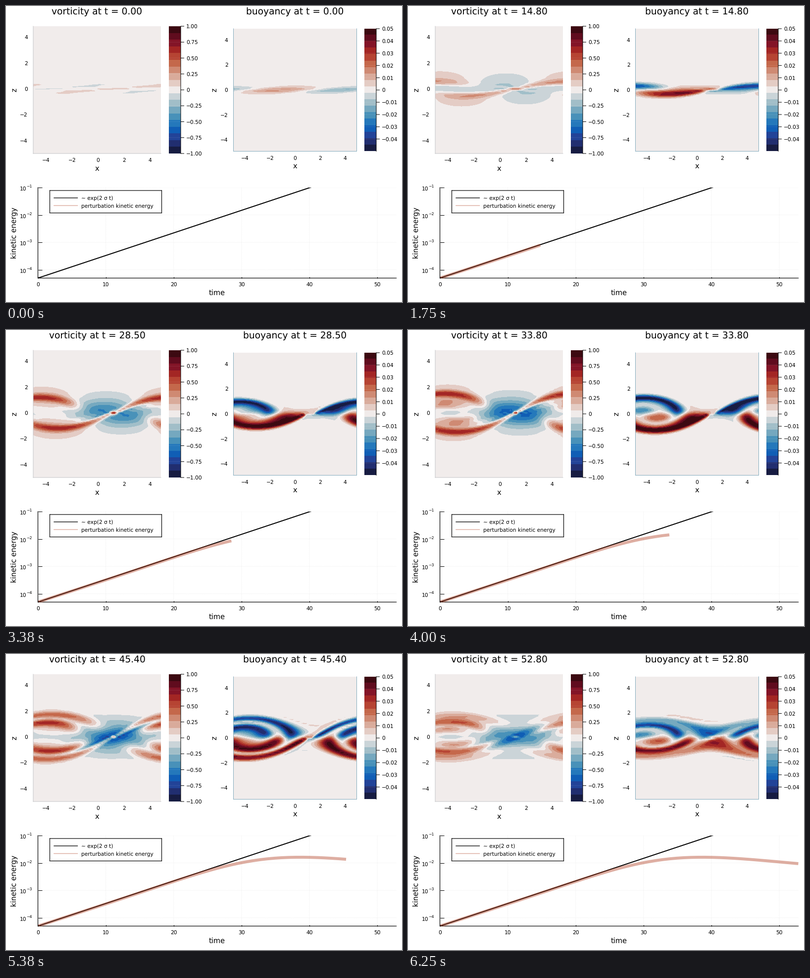
A matplotlib script for the animation above (6370 ms loop, 800 by 600 pixels).

```python
import math

import matplotlib.pyplot as plt
import numpy as np
from matplotlib.animation import FuncAnimation
from matplotlib.colors import LinearSegmentedColormap, ListedColormap

W, H, DPI = 800, 600, 100
PT = 72 / DPI                     # points per pixel
FRAMES, LOOP = 51, 6370
plt.rcParams.update({"font.family": "DejaVu Sans", "text.hinting": "none",
                     "path.snap": False})

# ---------------------------------------------------------------- flow solver
# Perturbations (u, w, b) of a stratified shear layer on a staggered grid,
# arrays indexed [z, x]; all stencils are small matrices.
N, HALF = 64, 5.0
DX = 2 * HALF / N
DT, VISC = 0.1, 2e-4
RI, DEPTH = 0.1, 0.25
SIGMA, ENERGY0 = 0.0948, 5e-5
BRAID_X = 1.19
SETTLE = 300

face = -HALF + DX * np.arange(N + 1)
cell = face[:-1] + DX / 2


def stencil(coefs, first, rows, cols, wrap):
    m = np.zeros((rows, cols))
    for r in range(rows):
        for j, c in enumerate(coefs):
            k = r + first + j
            m[r, k % cols if wrap else min(max(k, 0), cols - 1)] += c
    return m


def family(rows, cols, shift, wrap):
    """Sixth-order mean, upwind correction, two-point mean, difference."""
    sets = (np.array([1, -8, 37, 37, -8, 1]) / 60,
            np.array([1, -5, 10, -10, 5, -1]) / 60,
            [0.5, 0.5],
            [-1 / DX, 1 / DX])
    return [stencil(c, shift - len(c) // 2, rows, cols, wrap) for c in sets]


SXF, DXF, AXF, GXF = [m.T.copy() for m in family(N, N, 0, True)]
SXC, DXC, AXC, GXC = [m.T.copy() for m in family(N, N, 1, True)]
SZF, DZF, AZF, GZF = family(N + 1, N, 0, False)
SZC, DZC, AZC, GZC = family(N, N + 1, 1, False)
LX, LZC, LZF = GXF @ GXC, GZC @ GZF, GZF @ GZC

ex, QX = np.linalg.eigh(LX)
ez, QZ = np.linalg.eigh(LZC)
lam = ez[:, None] + ex[None, :]
lam[np.abs(lam) < 1e-8] = np.inf

U = np.tanh(cell)[:, None]
U_FACE = np.tanh(face)[:, None]
B = DEPTH * RI * np.tanh(cell / DEPTH)[:, None]


def flux(v, mean, corr, base=0.0):
    return (base + v) * mean + (np.abs(base) + np.abs(v)) * corr


def tendencies(u, w, b):
    a = u @ AXC
    du = -(flux(a, u @ SXC, u @ DXC, U) + a * U) @ GXF
    total = u + U
    du -= GZC @ flux(w @ AXF, SZF @ total, DZF @ total)
    du += VISC * (u @ LX + LZC @ u)

    dw = -flux(AZF @ u, w @ SXF, w @ DXF, U_FACE) @ GXC
    dw -= GZF @ flux(AZC @ w, SZC @ w, DZC @ w)
    dw += AZF @ b + VISC * (w @ LX + LZF @ w)
    dw[0] = dw[-1] = 0

    db = -(flux(u, b @ SXF, b @ DXF, U) + u * B) @ GXC
    total = b + B
    db -= GZC @ flux(w, SZF @ total, DZF @ total)
    db += VISC * (b @ LX + LZC @ b)
    return du, dw, db


def project(u, w):
    div = u @ GXC + GZC @ w
    phi = QZ @ ((QZ.T @ div @ QX) / lam) @ QX.T
    return u - phi @ GXF, w - GZF @ phi


def step(state):
    old = (0, 0, 0)
    for g, z in ((8 / 15, 0), (5 / 12, -17 / 60), (3 / 4, -5 / 12)):
        new = tendencies(*state)
        u, w, b = [s + DT * (g * n + z * o)
                   for s, n, o in zip(state, new, old)]
        state = (*project(u, w), b)
        old = new
    return state


def energy(state):
    u, w, _ = state
    return 0.5 * ((u ** 2).sum() + (w ** 2).sum()) / N ** 2


def unstable_wave(k):
    """Fastest growing linear mode: stream function and buoyancy profiles."""
    z, inner = face[1:-1], slice(1, -1)
    shear = np.tanh(z)
    curve = -2 * shear / np.cosh(z) ** 2
    strat = RI / np.cosh(z / DEPTH) ** 2
    lap = LZF[inner, inner] - k ** 2 * np.eye(N - 1)
    growth = 1j * k * np.block([
        [np.linalg.solve(lap, np.diag(curve) - shear[:, None] * lap),
         -np.linalg.solve(lap, AZF[inner])],
        [AZC[:, inner] * strat, -np.diag(U[:, 0])]])
    values, modes = np.linalg.eig(growth)
    mode = modes[:, values.real.argmax()]
    mode = mode / mode[N // 2 - 1]
    return np.pad(mode[:N - 1], 1), mode[N - 1:]


def growing_mode():
    """Let the linear mode adapt to the solver while tiny, then rescale."""
    k, amp = math.pi / HALF, 1e-6
    psi, b = unstable_wave(k)
    psi = amp * np.outer(psi, np.exp(1j * k * (face[:-1] - BRAID_X))).real
    b = amp * np.outer(b, np.exp(1j * k * (cell - BRAID_X))).real
    state = (GZC @ psi, -psi @ GXC, b)
    for _ in range(SETTLE):
        state = step(state)
    scale = math.sqrt(ENERGY0 / energy(state))
    return tuple(s * scale for s in state)


def simulate():
    state, done, out = growing_mode(), 0, []
    for k in range(FRAMES):
        goal = math.ceil(k * 0.1 / SIGMA / DT - 1e-9)
        while done < goal:
            state = step(state)
            done += 1
        u, w, b = state
        vort = (GZF @ u - w @ GXF)[:N]
        out.append((done * DT, vort, b, energy(state)))
    return out


history = simulate()
times = np.array([h[0] for h in history])
log_ke = np.log10([h[3] for h in history])

# ---------------------------------------------------------------- colours
BANDS = 19
ramp = [(23, 28, 66), (41, 58, 143), (11, 102, 189), (69, 144, 185),
        (142, 181, 194), (210, 216, 219), (241, 236, 235), (230, 210, 204),
        (213, 157, 137), (196, 101, 72), (172, 43, 36), (120, 14, 40),
        (60, 9, 17)]
stops = [i / 11 for i in range(6)] + [0.5] + [i / 11 for i in range(6, 12)]
balance = LinearSegmentedColormap.from_list(
    "balance", [(s, np.array(c) / 255) for s, c in zip(stops, ramp)], N=1024)
bands = [balance(i / (BANDS - 1)) for i in range(BANDS)]
KE_COLOR, KE_ALPHA = (176 / 255, 60 / 255, 30 / 255), 0.41

# ---------------------------------------------------------------- layout
fig = plt.figure(figsize=(W / DPI, H / DPI), dpi=DPI, facecolor="white")
SMALL, LABEL, TITLE = 10.67, 14.67, 18.67


def label(x, y, s, size=SMALL, ha="center", va="baseline", **kw):
    return fig.text(x / W, 1 - y / H, s, fontsize=size * PT, ha=ha, va=va, **kw)


def box(x0, y0, x1, y1):
    ax = fig.add_axes([x0 / W, 1 - y1 / H, (x1 - x0) / W, (y1 - y0) / H])
    ax.set_xticks([])
    ax.set_yticks([])
    return ax


def stroke(x, y, color="black", width=1.0):
    fig.add_artist(plt.Line2D(np.array(x) / W, 1 - np.array(y) / H,
                              color=color, lw=width * PT,
                              solid_capstyle="butt"))


def number(v, digits):
    return "0" if abs(v) < 1e-9 else f"{v:.{digits}f}".replace("-", "\u2212")


class Panel:
    """Filled contour map with its colour bar."""

    def __init__(self, name, rect, coords, limit, bar_x, ticks, edge, sides):
        self.name, self.coords, self.limit = name, coords, limit
        x0, y0, x1, y1 = rect
        lo, hi = coords[0], coords[-1]
        self.ax = box(*rect)
        self.ax.set(xlim=(lo, hi), ylim=(lo, hi), facecolor=bands[BANDS // 2])
        for side, spine in self.ax.spines.items():
            spine.set(visible=side in sides, color=edge, linewidth=PT)
        self.cs = None

        scale = (x1 - x0) / (hi - lo)
        for v in (-4, -2, 0, 2, 4):
            text = number(v, 0)
            label(x0 + (v - lo) * scale, y1 + 17, text)
            label(x0 - 11, y1 - (v - lo) * scale + 4, text, ha="right")
        mid = (x0 + x1) / 2
        label(mid, y1 + 34.5, "x", LABEL)
        label(x0 - 38, 170, "z", LABEL, va="center", rotation=90)
        self.title = label(mid, 17.5, "", TITLE)

        bar = box(bar_x, y0, bar_x + 24, y1)
        bar.imshow(np.arange(BANDS)[:, None], cmap=ListedColormap(bands),
                   aspect="auto", origin="lower", interpolation="nearest",
                   extent=(0, 1, -limit, limit))
        for side in ("left", "top", "bottom"):
            bar.spines[side].set_visible(False)
        bar.spines["right"].set_linewidth(PT)
        for v in ticks:
            y = y0 + (limit - v) / (2 * limit) * (y1 - y0)
            bar.axhline(v, color="white", alpha=0.3, lw=0.8 * PT, ls=":")
            stroke((bar_x + 24, bar_x + 31), (y, y))
            label(bar_x + 35, y + 4, number(v, 2), ha="left")

    def show(self, field, t):
        if self.cs is not None:
            self.cs.remove()
        levels = np.linspace(-self.limit, self.limit, BANDS + 1)[1:-1]
        self.cs = self.ax.contourf(self.coords, self.coords, field,
                                   levels=levels, colors=bands, extend="both")
        self.title.set_text(f"{self.name} at t = {t:.2f}")


vorticity = Panel("vorticity", (55, 41, 313, 299), face[:-1], 1.0, 329,
                  np.linspace(-1, 1, 9), "#c4c6c8", ("left", "bottom"))
buoyancy = Panel("buoyancy", (459.5, 46, 708.5, 294.5), cell, 0.05, 724,
                 np.arange(-4, 6) / 100, "#86adbf",
                 ("left", "bottom", "right"))

# ---------------------------------------------------------------- energy plot
X0, X1, Y0, Y1 = 64.5, 788.5, 368, 551.5
chart = box(X0, Y0, X1, Y1)
floor = math.log10(ENERGY0)
chart.set(xticks=range(0, 60, 10), yticks=[-4, -3, -2, -1])
chart.set(xlim=(0, times[-1]), ylim=(floor, -1))
chart.tick_params(direction="in", labelbottom=False, labelleft=False,
                  width=PT)
chart.tick_params(axis="x", length=3 * PT)
chart.tick_params(axis="y", length=8 * PT)
chart.grid(color="#e4e4e4", lw=0.8 * PT, ls=":")
chart.set_axisbelow(True)
for side, spine in chart.spines.items():
    spine.set(visible=side in ("left", "bottom"), linewidth=1.2 * PT)

for v in range(0, 60, 10):
    label(X0 + v / times[-1] * (X1 - X0), 567.5, str(v))
for p in (-4, -3, -2, -1):
    y = Y0 + (p + 1) / (floor + 1) * (Y1 - Y0)
    label(41.5, y + 6, "10", ha="right")
    label(41.5, y + 0.5, number(p, 0), 7.8, ha="left")
label(426, 586, "time", LABEL)
label(16.5, 459.5, "kinetic energy", LABEL, va="center", rotation=90)

span = np.array([0, 60])
chart.plot(span, floor + 2 * SIGMA * span / math.log(10), color="black",
           lw=2 * PT)
ke_line, = chart.plot([], [], color=KE_COLOR, alpha=KE_ALPHA, lw=6 * PT,
                      solid_capstyle="butt", zorder=3)

key_rect = (88.5, 374, 314.5, 419.5)
key = box(*key_rect)
for spine in key.spines.values():
    spine.set_linewidth(1.2 * PT)
key.set(xlim=key_rect[::2], ylim=key_rect[:0:-2])
key.plot([97, 144.5], [389, 389], color="black", lw=1.3 * PT)
key.plot([97, 144.5], [404.5, 404.5], color=KE_COLOR, alpha=KE_ALPHA,
         lw=1.5 * PT)
label(152, 393, "~ exp(2 \u03c3 t)", ha="left")
label(152, 408.5, "perturbation kinetic energy", ha="left")


def draw(k):
    t, vort, b, _ = history[k]
    vorticity.show(vort, t)
    buoyancy.show(b, t)
    ke_line.set_data(times[:k + 1], log_ke[:k + 1])
    return ()


anim = FuncAnimation(fig, draw, frames=FRAMES, interval=LOOP / FRAMES,
                     init_func=lambda: draw(0), repeat=True, repeat_delay=0)
plt.show()
```
